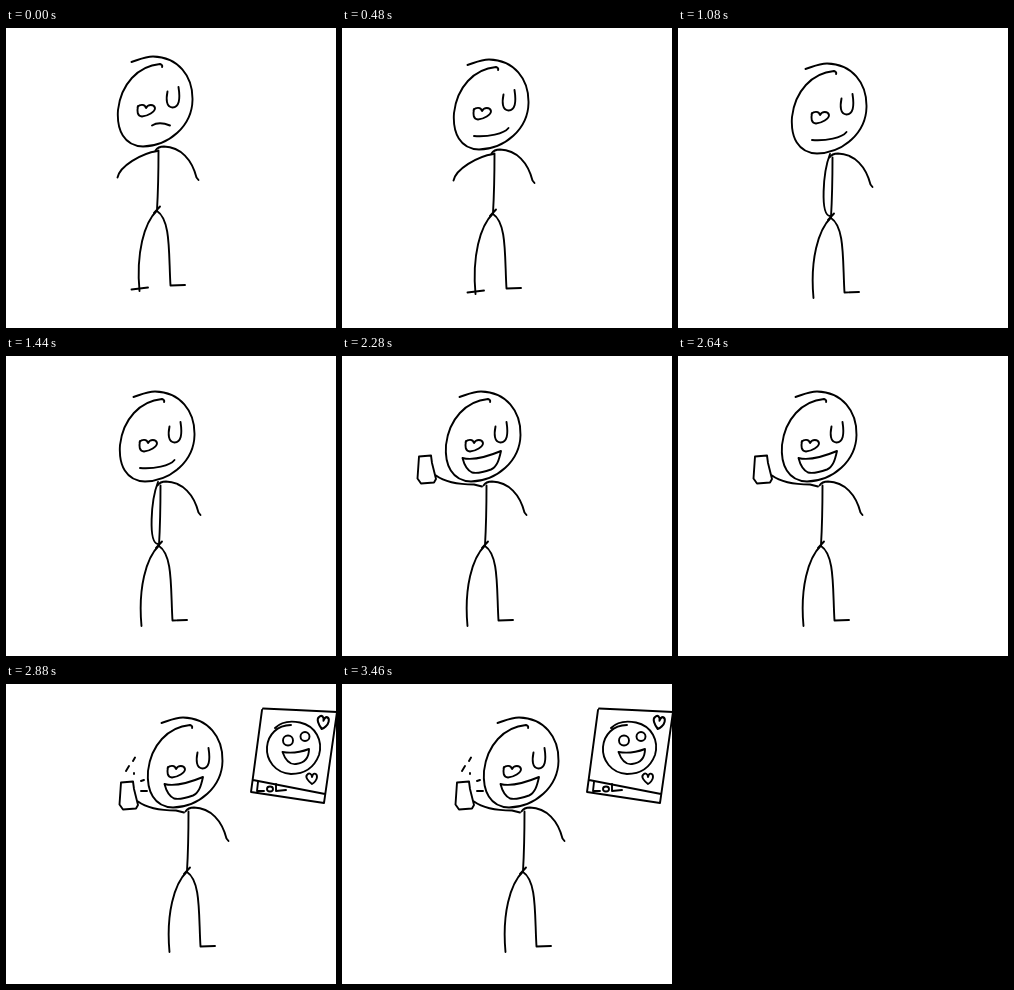
An HTML page without scripts that plays this animation: 330x300 px, repeating every 3.84 s.

```html
<!DOCTYPE html>
<html lang="en">
<head>
<meta charset="utf-8">
<title>Stick figure selfie</title>
<style>
  html, body { margin: 0; width: 100%; height: 100%; overflow: hidden; background: #fff; }
  svg { display: block; width: 100%; height: 100%; }
  .ink { fill: none; stroke: #000; stroke-width: 1.9; stroke-linecap: round; stroke-linejoin: round; }

  .figure, .pose { animation: 3840ms step-end infinite; }
  .pose { visibility: hidden; }
  .figure { animation-name: sway; }
  .frown { animation-name: frown; }
  .smile { animation-name: smile; }
  .laugh { animation-name: laugh; }
  .relaxed { animation-name: relaxed; }
  .tucked { animation-name: tucked; }
  .reaching { animation-name: reaching; }
  .snap { animation-name: snap; }

  @keyframes sway {
    0% { transform: translate(0, 0); }
    12.5% { transform: translate(0, 3px); }
    28.125% { transform: translate(2px, 7px); }
    43.75% { transform: translate(-5px, 7px); }
    59.375% { transform: translate(-8px, 7px); }
    75%, 100% { transform: translate(30px, 5px); }
  }
  @keyframes frown { 0% { visibility: visible; } 12.5%, 100% { visibility: hidden; } }
  @keyframes smile { 0%, 59.375%, 100% { visibility: hidden; } 12.5% { visibility: visible; } }
  @keyframes laugh { 0% { visibility: hidden; } 59.375%, 100% { visibility: visible; } }
  @keyframes relaxed { 0% { visibility: visible; } 28.125%, 100% { visibility: hidden; } }
  @keyframes tucked { 0%, 43.75%, 100% { visibility: hidden; } 28.125% { visibility: visible; } }
  @keyframes reaching { 0%, 59.375%, 100% { visibility: hidden; } 43.75% { visibility: visible; } }
  @keyframes snap { 0% { visibility: hidden; } 75%, 100% { visibility: visible; } }
</style>
</head>
<body>
<svg viewBox="0 0 330 300" class="ink">
  <g class="figure">
    <!-- head and eyes -->
    <path d="M125.5 34C132 32 139 28.5 147 28.5C172 29 187 48 186.5 72C186 98 163 118 137 118.5C118 118 110.500 102 112 82C115 56 132 38 154 36Q157 37 156 39"/>
    <path d="M161.500 63.500C160 71 160 79 166.500 79.500C173 79 174.500 72 172.500 59"/>
    <path d="M132 78C131 83 131 88 136 88.500C142 88 149 84 149 80C148 76 142 76 140 80C139 76 134 76 131.500 79"/>

    <!-- body, right arm and legs -->
    <path d="M149.500 122.500Q152 118.500 158 118.500C175 119 186 132 190.500 149.500L192.500 152"/>
    <path d="M152.500 122.500C152.500 145 152 165 151 182M148 185L154 178.500"/>
    <path d="M151 182.500C138 195 130 225 133.500 263M151 183C165 192 162.500 225 164.500 257.500L179 257"/>

    <path class="pose frown" d="M146 97.500Q153 93 164 97.500"/>
    <path class="pose smile" d="M132 105C146 106 162 103 166.500 97"/>
    <path class="pose laugh" d="M128.500 95C140 98 155 93 167 88C165 97 163 104 157 106.500C150 109 142 110.500 138 109.500C133 107 130 101 128.500 95Z"/>

    <!-- left arm -->
    <path class="pose relaxed" d="M151.500 123C135 125.500 114 138 111.500 149.500M125.500 261.500L142 259.500"/>
    <path class="pose tucked" d="M150 119C143 137 140 180 150 181"/>
    <path class="pose reaching" d="M149 123.500C141 126 133 148 110 157M89 150.500L98 146L102 146.500L114 167L112 171L105 174L97 170Z"/>
    <path class="pose laugh" d="M102 112.500C112 120 126 121.500 140 121.500L148 123.500M85 93.500L97 92.500L98 100L102 116L100 119.500L87 120.500L83.500 115.500Z"/>
  </g>

  <g class="pose snap">
    <path d="M120 87L123 82M127 77L129 73.500M128 89L128 90M135 97L138 96M135 107L141 107"/>

    <!-- printed photo -->
    <path d="M257 24.500L290 26L331 28L318 119L245 108L256 26M247 96L319 110"/>
    <path d="M252 98L251 107L258 107M270 100L270 107L280 106"/>
    <ellipse cx="264" cy="105" rx="3" ry="2.5"/>
    <path d="M269 44C276 37 284 36.500 294 38.500C310 42 317 57 313 71C308 84 298 90 285 90C269 89 260 76 261 63C262 51 271 41 285 41"/>
    <circle cx="282" cy="56.500" r="5"/>
    <circle cx="299" cy="52.500" r="4.500"/>
    <path d="M276.500 68C285 69.500 295 68 303 65C303 73 299 79 290 80C283 81 279 75 276.500 68Z"/>
    <path id="heart" d="M306 100C302 97 299 93 301 91C303 88 306 90 306 93C307 88 311 89 311 93C311 96 308 99 306 100Z"/>
    <use href="#heart" transform="translate(317 39) rotate(12) scale(1.05 1.2) translate(-306 -95)"/>
  </g>
</svg>
</body>
</html>
```
